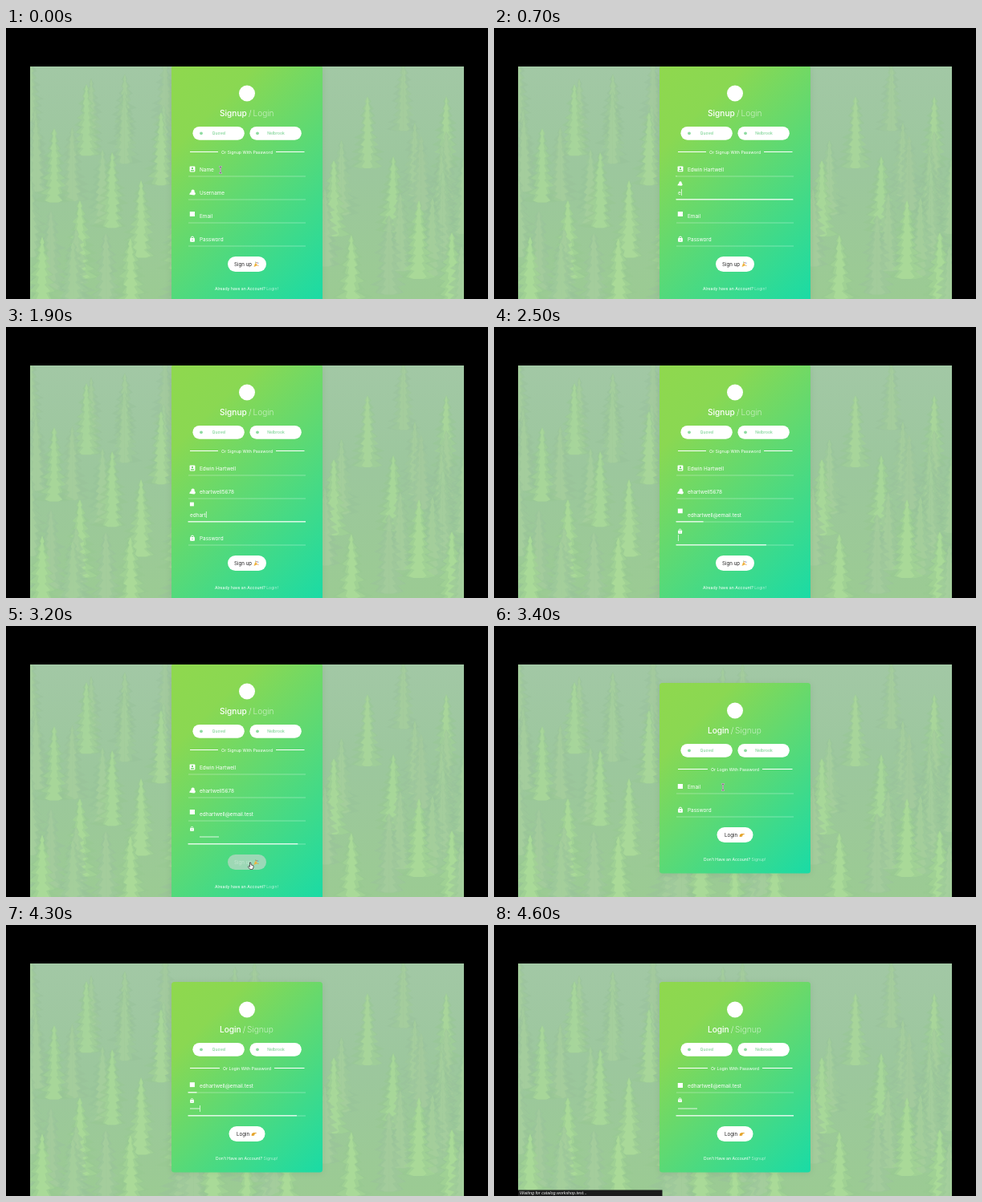
Animation, 600 px wide and 338 px high, one loop 4700 ms. Source, as an HTML page with a canvas:

```html
<!DOCTYPE html>
<html lang="en">
<head>
<meta charset="utf-8">
<title>Signup and login</title>
<style>
html, body { margin: 0; width: 100%; height: 100%; overflow: hidden; background: #000; }
canvas { display: block; width: 600px; height: 338px; }
</style>
</head>
<body>
<canvas id="stage"></canvas>
<script>
const W = 600, H = 338, LOOP = 4700, STEP = 100, EASE = 300;
const FONT = 'Inter, "Open Sans", sans-serif';
const stage = document.getElementById('stage');
const scale = Math.max(1, window.devicePixelRatio || 1);
const c = setup(stage);

const EMAIL = 'edhartwell@email.test';
const DOTS = '*'.repeat(12);
const LOGIN_AT = 3400;

// on/off: focus interval, from/to: typing interval
const signup = {
  top: 47, bottom: 342, head: ['Signup', 'Login'], slash: 302, alt: 307.5,
  rule: ['Or Signup With Password', 264, 336], press: 3176,
  button: ['Sign up', 276, 285, 48, 284, drawPopper],
  foot: ['Already have an Account?', 'Login!', 260],
  fields: [
    { label: 'Name', y: 176, icon: badge, text: 'Edwin Hartwell', on: 30, off: 430, from: 70, to: 400 },
    { label: 'Username', y: 205, icon: person, text: 'ehartwell5678', on: 430, off: 1480, from: 620, to: 1300 },
    { label: 'Email', y: 234, lift: 2, icon: mail, text: EMAIL, on: 1480, off: 2360, from: 1720, to: 2300 },
    { label: 'Password', y: 263, icon: lock, text: DOTS, on: 2360, off: 3176, from: 2520, to: 3080 }
  ]
};
const login = {
  top: 71, bottom: 308.5, head: ['Login', 'Signup'], slash: 294.7, alt: 300,
  rule: ['Or Login With Password', 266, 334], press: Infinity,
  button: ['Login', 277.5, 251, 45, 287, drawFinger],
  foot: ["Don't Have an Account?", 'Signup!', 261],
  fields: [
    { label: 'Email', y: 200, icon: mail, text: EMAIL, on: 3500, off: 4100, from: 3540, to: 4040 },
    { label: 'Password', y: 229, icon: lock, text: DOTS, on: 4100, off: Infinity, from: 4180, to: 4400 }
  ]
};

function setup(canvas) {
  canvas.width = W * scale;
  canvas.height = H * scale;
  const ctx = canvas.getContext('2d');
  ctx.scale(scale, scale);
  return ctx;
}

const clamp = v => Math.max(0, Math.min(1, v));
const white = a => `rgba(255,255,255,${a})`;

// CSS "ease", cubic-bezier(.25, .1, .25, 1)
function ease(x) {
  x = clamp(x);
  const bez = (s, a, b) => 3 * s * (1 - s) ** 2 * a + 3 * s * s * (1 - s) * b + s ** 3;
  let lo = 0, hi = 1;
  for (let i = 0; i < 20; i++) {
    const m = (lo + hi) / 2;
    if (bez(m, .25, .25) < x) lo = m; else hi = m;
  }
  return bez(lo, .1, 1);
}

function text(s, x, y, size, color = '#fff', weight = 400, align = 'left') {
  c.font = `${weight} ${size}px ${FONT}`;
  c.textAlign = align;
  c.fillStyle = color;
  c.fillText(s, x, y + size * .36 + .3);
  return c.measureText(s).width;
}

function pill(x, y, w, h, color, r = h / 2) {
  c.fillStyle = color;
  c.beginPath();
  c.roundRect(x, y, w, h, r);
  c.fill();
}

function disc(x, y, r, color) {
  c.fillStyle = color;
  c.beginPath();
  c.arc(x, y, r, 0, 7);
  c.fill();
}

function poly(points, color, line) {
  c.beginPath();
  for (let i = 0; i < points.length; i += 2) c.lineTo(points[i], points[i + 1]);
  c.closePath();
  c.fillStyle = color;
  c.fill();
  if (line) { c.strokeStyle = line; c.lineWidth = .7; c.stroke(); }
}

function line(x1, x2, y, w, color) {
  c.fillStyle = color;
  c.fillRect(x1, y - w / 2, x2 - x1, w);
}

function at(x, y, k, draw) {
  c.save();
  c.translate(x, y);
  c.scale(k, k);
  draw();
  c.restore();
}

// Field icons, centred on the origin
function badge() {
  pill(-3.4, -3.4, 6.8, 6.8, '#fff', .8);
  disc(0, -1, 1.2, '#72d96a');
  pill(-2.2, 1, 4.4, 1.4, '#72d96a', .7);
}
function person() {
  disc(.6, -1.4, 2.1, '#fff');
  poly([-4, 2.6, -2, -.4, 3, -.6, 4, 2, 2.4, 3.4, -1.6, 3], '#fff');
}
function mail() {
  pill(-3.2, -3, 6.2, 6, '#fff', 0);
}
function lock() {
  pill(-2.9, -1, 5.8, 4.8, '#fff', .7);
  c.strokeStyle = '#fff';
  c.lineWidth = 1;
  c.beginPath();
  c.arc(0, -1.2, 1.7, Math.PI, 0);
  c.stroke();
  disc(0, 1.4, .7, '#63d97a');
}

function drawPopper(y) {
  at(311.5, y, 1, () => {
    poly([-3, 3.2, -1.2, -1.8, 1.8, 1.4], '#eeb23c');
    disc(.6, -2, .7, '#d9534a');
    disc(2.4, -1.6, .7, '#4a9fd9');
    disc(2.4, 1.6, .6, '#e08a3a');
    disc(-.8, -2.6, .6, '#59b45a');
  });
}
function drawFinger(y) {
  at(308.5, y, 1, () => {
    poly([-3, 2, -2.4, -.6, -.4, -1.8, 3.2, -1.6, 3.2, -.6, 1.2, -.4, .8, 1.6, -1, 2.2], '#e5a52e');
  });
}

function makeForest() {
  let seed = 11;
  const rnd = () => (seed = (seed * 16807) % 2147483647) / 2147483647;
  const layer = document.createElement('canvas');
  const g = setup(layer);
  g.beginPath();
  g.rect(30, 48, 540, 290);
  g.clip();
  const base = g.createLinearGradient(0, 48, 0, H);
  base.addColorStop(0, '#a2c8a5');
  base.addColorStop(.45, '#9cc79d');
  base.addColorStop(1, '#9bcb93');
  g.fillStyle = base;
  g.fillRect(30, 48, 540, 290);

  // Flat jagged conifer; glow runs from shaded (0) to sunlit (1)
  function conifer(x, y, h, w, glow) {
    const tiers = 10;
    const layers = [
      [1, .5, `hsl(${126 - 14 * glow}, ${22 + 14 * glow}%, 68%)`],
      [.72, .6, `hsl(${116 - 10 * glow}, ${28 + 18 * glow}%, ${70 + 2 * glow}%)`],
      [.42, .6, `hsl(${110 - 8 * glow}, ${30 + 25 * glow}%, ${71 + 4 * glow}%)`]
    ];
    for (const [spread, alpha, color] of layers) {
      g.globalAlpha = alpha;
      g.fillStyle = color;
      for (const s of [-1, 1]) {
        g.beginPath();
        g.moveTo(x, y);
        for (let k = 1; k <= tiers; k++) {
          const r = spread * w * (k / tiers) ** .7 * (.7 + rnd() * .6);
          g.lineTo(x + s * r, y + h * (k - .25) / tiers);
          g.lineTo(x + s * r * .5, y + h * k / tiers);
        }
        g.lineTo(x, y + h);
        g.fill();
      }
    }
  }

  const trees = [];
  for (let i = 0; i < 46; i++) {
    trees.push([30 + rnd() * 540, 30 + i * 5.5, .12 + rnd() * .2]);
  }
  const sunlit = [
    [100, 70], [60, 125], [193, 105], [132, 155], [168, 190], [92, 215], [155, 262], [215, 205], [258, 255],
    [450, 85], [408, 165], [482, 160], [514, 215], [430, 258], [548, 85], [350, 280], [300, 295], [45, 260], [555, 255]
  ];
  for (const [x, y] of sunlit) trees.push([x, y, .55 + y / 650]);
  trees.sort((a, b) => a[1] - b[1]);
  for (const [x, y, glow] of trees) conifer(x, y, 85 + y * .06, 17 + y * .03, glow);
  return layer;
}
const forest = makeForest();

function drawCard(p) {
  const w = 188, h = p.bottom - p.top, mid = p.top + h / 2, q = (w + h) / 4;
  const fill = c.createLinearGradient(300 - q, mid - q, 300 + q, mid + q);
  fill.addColorStop(0, '#8fd84e');
  fill.addColorStop(.22, '#8ad852');
  fill.addColorStop(1, '#19dba6');
  c.save();
  c.shadowColor = 'rgba(0,0,0,.08)';
  c.shadowBlur = 8 * scale;
  c.shadowOffsetY = scale;
  pill(206, p.top, w, h, fill, 3.5);
  c.restore();
}

function drawField(f, t) {
  const focused = t >= f.on && t < f.off;
  const grow = t < f.off ? ease((t - f.on) / EASE) : 1 - ease((t - f.off) / EASE);
  const count = Math.floor(clamp((t - f.from) / (f.to - f.from)) * f.text.length);
  const x = focused ? 229 : 241;
  const base = f.y + 9;

  at(232 - .5 * grow, f.y - (f.lift || 0) - 11 * grow, 1 - .2 * grow, f.icon);
  line(227, 373, base, .7, white(.45));
  if (grow > 0) line(226.5, 226.5 + 146.5 * grow, base - .2, 1.1, '#fff');

  let end = x;
  if (f.text === DOTS) {
    for (let i = 0; i < count; i++) disc(x + 1 + i * 2, f.y, .75, '#fff');
    end += count * 2;
  } else {
    end += text(f.text.slice(0, count), x, f.y, 6.4);
  }
  if (!count && !focused) text(f.label, 241, f.y, 6.4);
  if (focused && t < f.to + 150) {
    c.fillStyle = '#fff';
    c.fillRect(end + .3, f.y - 4, .7, 8);
  }
}

function drawPage(p, t) {
  drawCard(p);
  const y = p.top;
  disc(300, y + 34.5, 10, '#fff');
  text(p.head[0], 266, y + 59, 10.1, '#fff', 500);
  text('/', p.slash, y + 59, 10.1, white(.75), 300);
  text(p.head[1], p.alt, y + 59, 10.1, white(.6), 300);

  for (const [x, dot, mid, name] of [[232.4, 243, 265, 'Quovel'], [303.4, 313, 336, 'Nelbrook']]) {
    pill(x, y + 75.9, 64.4, 16.8, '#fff');
    disc(dot, y + 84.3, 1.9, '#8fdba2');
    text(name, mid, y + 84.3, 5, '#7dd394', 500, 'center');
  }

  const [rule, left, right] = p.rule;
  line(229, left, y + 107.5, 1, '#fff');
  line(right, 371.5, y + 107.5, 1, '#fff');
  text(rule, 300, y + 107.4, 5.3, '#fff', 400, 'center');

  for (const f of p.fields) drawField(f, t);

  const [label, bx, by, bw, tx, emoji] = p.button;
  const pressed = t >= p.press;
  pill(bx, by, bw, 19, pressed ? 'rgba(205,215,208,.65)' : '#fff');
  text(label, tx, by + 9.7, 6.2, pressed ? white(.4) : '#222');
  emoji(by + 9.7);

  const [ask, link, fx] = p.foot;
  const fy = p.bottom - 17.3;
  const w = text(ask, fx, fy, 5.1);
  text(link, fx + w + 1.4, fy, 5.1, white(.75), 300);
}

function drawBeam(x, y) {
  at(x, y, 1, () => {
    for (const [color, w] of [['#fff', 1.9], ['#333', .8]]) {
      c.strokeStyle = color;
      c.lineWidth = w;
      c.beginPath();
      c.moveTo(-1.8, -4); c.lineTo(1.8, -4);
      c.moveTo(0, -4); c.lineTo(0, 4);
      c.moveTo(-1.8, 4); c.lineTo(1.8, 4);
      c.stroke();
    }
  });
}

function drawPointer(x, y) {
  const hand = [-1, -4, .3, -4, .6, -1, 3.2, -.4, 3.6, 1.6, 2.6, 4.4, -.8, 4.4, -3.2, 1.2, -2.4, .4, -1, 1.4];
  const arrow = [-2, -4, 3, 1, .6, 1.2, 1.8, 3.8, .6, 4.2, -.5, 1.6, -2, 3];
  at(x, y, 1, () => poly(y > 285 ? hand : arrow, '#fff', '#222'));
}

function drawMouse(t) {
  if (t < 100) drawBeam(267, 177);
  else if (t >= 3000 && t < LOGIN_AT) {
    const k = ease((t - 3000) / 180);
    drawPointer(280 + 24.5 * k, 220 + 79 * k);
  } else if (t >= LOGIN_AT && t < 3540) drawBeam(285, 201);
}

function drawStatus() {
  pill(30, 330.5, 179.5, 8, '#1b1b1b', 0);
  c.font = 'italic 5.4px "Liberation Sans", sans-serif';
  c.textAlign = 'left';
  c.fillStyle = '#eee';
  c.fillText('Waiting for catalog.workshop.test...', 32, 336);
}

function draw(t) {
  c.fillStyle = '#000';
  c.fillRect(0, 0, W, H);
  c.drawImage(forest, 0, 0, W, H);
  c.save();
  c.beginPath();
  c.rect(30, 48, 540, 290);
  c.clip();
  drawPage(t < LOGIN_AT ? signup : login, t);
  drawMouse(t);
  if (t >= 4500 || (t >= 3300 && t < LOGIN_AT)) drawStatus();
  c.restore();
}

const start = performance.now();
function tick() {
  const t = (performance.now() - start) % LOOP;
  draw(Math.floor(t / STEP) * STEP);
  requestAnimationFrame(tick);
}
tick();
</script>
</body>
</html>
```
